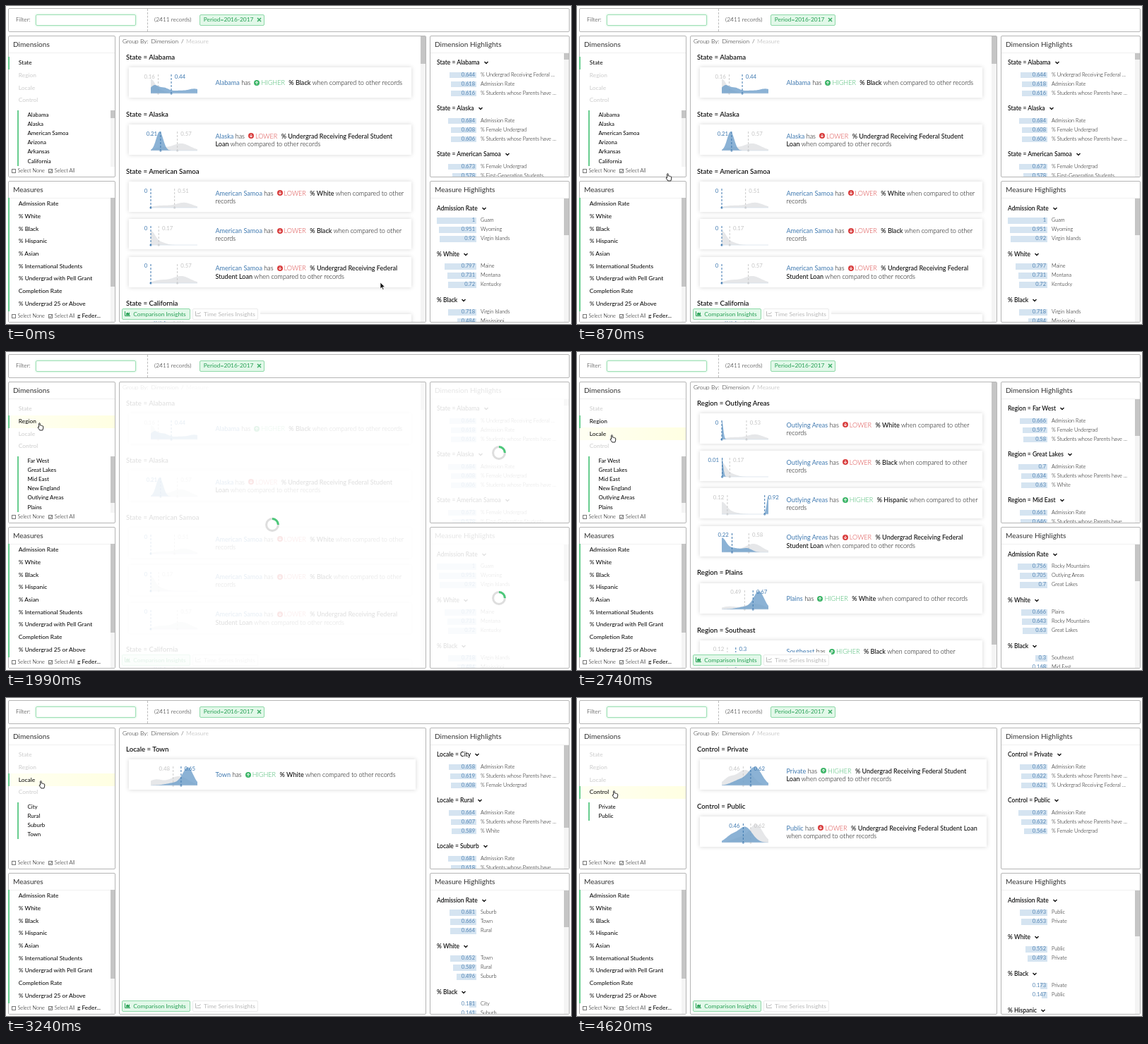
Animation, 800 px wide and 451 px high, one loop 4.86 s. Source, as an HTML page:

```html
<!DOCTYPE html>
<html lang="en">
<head>
<meta charset="utf-8">
<title>Insights dashboard</title>
<style>
html, body { margin: 0; width: 100%; height: 100%; overflow: hidden; background: #fff; }
#stage { position: relative; width: 800px; height: 451px; overflow: hidden; font: 8.4px Lato, sans-serif; color: #222; }
#stage div, #stage i, #stage svg { position: absolute; box-sizing: border-box; }
/* Zero line height plus this margin makes "top" the text baseline. */
i { font-style: normal; white-space: nowrap; line-height: 0; margin-top: -.387em; }
b { font-weight: 500; color: #111; }
svg { overflow: visible; }
.panel { border: 1px solid #b5b5b5; border-radius: 2px; background: #fff; }
.layer { left: 0; top: 0; width: 800px; height: 451px; }
.title { font-size: 10.1px; color: #333; }
.soft { font-weight: 300; color: #111; }
.dim { color: #ccc; }
.item { font-size: 7.9px; color: #000; }
.small { font-size: 7.3px; font-weight: 300; color: #000; }
.row { color: #000; }
.group { font-size: 9.7px; font-weight: 500; color: #000; }
.head { font-size: 8.5px; font-weight: 500; color: #000; }
.head svg { left: 100%; margin-left: 6px; top: -2px; }
.value { font-size: 7.5px; color: #5384b3; transform: translateX(-100%); }
.num { font-size: 7.8px; }
.right { transform: translateX(-100%); }
.note { font-size: 9.05px; font-weight: 300; color: #000; }
.note em { font-style: normal; font-weight: 400; color: #3f79b0; }
.note span { position: relative; margin: 0 3px 0 2.6px; padding-left: 10px; }
.note span svg { left: 0; top: 1.7px; }
.up { color: #3db568; }
.down { color: #d93f3f; }
.tag { color: #27a055; }
.off { color: #b8b8b8; }
.chip { background: #e2f8e9; border: 1px solid #8ed9a8; border-radius: 2px; }
.input { border: 1px solid #9fe0b6; border-radius: 2px; box-shadow: 0 0 3px #b4ebc7; }
.tab { border: 1px solid #ebebeb; border-radius: 2px; }
.divider { border-left: 1px dashed #bbb; }
.cover { background: #fff; }
.card { background: #fff; box-shadow: 0 0 6px rgba(0,0,0,.17); }
.bar { background: #d5e4f1; }
.green { background: #68cd8f; }
.thumb { background: #c5c5c5; }
.track { background: #f4f4f4; }
.rule { height: 1px; background: #f0f0f0; }
.tick { border: .7px solid #777; }
.clip { overflow: hidden; }
#hover { left: 4px; width: 150px; height: 18px; background: linear-gradient(90deg, #fffff2, #ffffe2); }
</style>
</head>
<body>
<div id="stage"></div>
<script>
const LOOP = 4860, STEP = 125;
const DIMENSIONS = ['State', 'Region', 'Locale', 'Control'];
const rowY = k => 83.7 + k * 17.65;

const text = (x, y, html, cls = '') => `<i class="${cls}" style="left:${x}px;top:${y}px">${html}</i>`;
const box = (x, y, w, h, cls, inner = '') =>
  `<div class="${cls}" style="left:${x}px;top:${y}px;width:${w}px;height:${h}px">${inner}</div>`;
const svg = (x, y, w, h, inner) =>
  `<svg style="left:${x}px;top:${y}px" width="${w}" height="${h}">${inner}</svg>`;
const layer = (id, inner) => `<div class="layer" id="${id}">${inner}</div>`;

// Distributions: lists of [mean, spread, height].
const WHITE = [[.72, .17, 7], [.25, .2, 3]];
const BLACK = [[0, .09, 19], [.2, .12, 4]];
const HISPANIC = [[0, .1, 16], [.2, .15, 3]];
const LOAN = [[.65, .19, 10], [.2, .15, 4]];
const SPIKE = [[0, .03, 27]];
const PEAK = [[.8, .11, 24], [.55, .2, 4]];
const NONE = [];

const same = 'when compared to other';
const loan = ['<b>% Undergrad Receiving Federal</b>', `<b>Student Loan</b> ${same} records`];
const loanWide = ['<b>% Undergrad Receiving Federal Student</b>', `<b>Loan</b> ${same} records`];
const split = m => [`<b>% ${m}</b> ${same}`, 'records'];
const whole = m => [`<b>% ${m}</b> ${same} records`];

const AR = 'Admission Rate', FU = '% Female Undergrad', UR = '% Undergrad Receiving Federal ...',
  SP = '% Students whose Parents have ...', W = '% White', B = '% Black';

// Each group: [name, cards]; each card: [up, value, other value, text lines, shape, other shape].
const VIEWS = [
  {
    items: ['Alabama', 'Alaska', 'American Samoa', 'Arizona', 'Arkansas', 'California'],
    itemThumb: 11, mainThumb: 39, dimThumb: 10, measureThumb: 53,
    groups: [
      ['Alabama', [[1, .44, .16, whole('Black'), [[.07, .09, 11], [.28, .1, 7], [.6, .18, 4], [.95, .13, 6]], BLACK]]],
      ['Alaska', [[0, .21, .57, loanWide, [[.19, .075, 27]], LOAN]]],
      ['American Samoa', [
        [0, 0, .51, split('White'), NONE, WHITE],
        [0, 0, .17, split('Black'), NONE, BLACK],
        [0, 0, .57, loan, NONE, LOAN]]],
      ['California', [[0, .3, .5, ['', ''], NONE, NONE]]],
    ],
    dims: [['Alabama', [.644, UR], [.618, AR], [.616, SP]],
      ['Alaska', [.684, AR], [.608, FU], [.606, SP]],
      ['American Samoa', [.673, FU], [.578, '% First-Generation Students']]],
    measures: [[AR, [1, 'Guam'], [.951, 'Wyoming'], [.92, 'Virgin Islands']],
      [W, [.797, 'Maine'], [.731, 'Montana'], [.72, 'Kentucky']],
      [B, [.718, 'Virgin Islands'], [.484, 'Mississippi']]],
  },
  {
    items: ['Far West', 'Great Lakes', 'Mid East', 'New England', 'Outlying Areas', 'Plains'],
    itemThumb: 66, mainThumb: 372, dimThumb: 53, measureThumb: 53,
    groups: [
      ['Outlying Areas', [
        [0, 0, .53, split('White'), SPIKE, WHITE],
        [0, .01, .17, split('Black'), SPIKE, BLACK],
        [1, .92, .12, split('Hispanic'), [[1, .035, 26]], HISPANIC],
        [0, .22, .58, loan, [[0, .09, 19], [.25, .15, 6], [.55, .1, 5]], [[.68, .18, 12], [.25, .15, 3]]]]],
      ['Plains', [[1, .67, .49, whole('White'), PEAK, [[.7, .2, 8], [.15, .16, 4]]]]],
      ['Southeast', [[1, .3, .12, split('Black'), [[.1, .12, 9], [.4, .25, 5]], BLACK]]],
    ],
    dims: [['Far West', [.666, AR], [.597, FU], [.58, SP]],
      ['Great Lakes', [.7, AR], [.634, SP], [.63, W]],
      ['Mid East', [.661, AR], [.646, SP]]],
    measures: [[AR, [.756, 'Rocky Mountains'], [.705, 'Outlying Areas'], [.7, 'Great Lakes']],
      [W, [.666, 'Plains'], [.643, 'Rocky Mountains'], [.63, 'Great Lakes']],
      [B, [.3, 'Southeast'], [.168, 'Mid East']]],
  },
  {
    items: ['City', 'Rural', 'Suburb', 'Town'],
    dimThumb: 118, measureThumb: 53,
    groups: [['Town', [[1, .65, .48, whole('White'), PEAK, [[.6, .2, 13], [.1, .15, 8]]]]]],
    dims: [['City', [.658, AR], [.619, SP], [.608, FU]],
      ['Rural', [.664, AR], [.607, SP], [.589, W]],
      ['Suburb', [.681, AR], [.618, SP]]],
    measures: [[AR, [.681, 'Suburb'], [.666, 'Town'], [.664, 'Rural']],
      [W, [.652, 'Town'], [.589, 'Rural'], [.496, 'Suburb']],
      [B, [.181, 'City'], [.161, 'Suburb']]],
  },
  {
    items: ['Private', 'Public'],
    measureThumb: 66,
    groups: [
      ['Private', [[1, .62, .46, loanWide, [[.72, .14, 25], [.4, .17, 8]], [[.5, .17, 22], [.15, .12, 10]]]]],
      ['Public', [[0, .46, .62, ['<b>% Undergrad Receiving Federal Student Loan</b>', `${same} records`],
        [[.5, .15, 22], [.2, .12, 9]], [[.74, .14, 25], [.4, .17, 7]]]]],
    ],
    dims: [['Private', [.653, AR], [.622, SP], [.621, UR]],
      ['Public', [.693, AR], [.632, SP], [.564, FU]]],
    measures: [[AR, [.693, 'Public'], [.653, 'Private']],
      [W, [.552, 'Public'], [.493, 'Private']],
      [B, [.173, 'Private'], [.147, 'Public']], ['% Hispanic']],
  },
];

function area(shape, color) {
  if (!shape.length) return '';
  let d = 'M0 37';
  for (let x = 0; x <= 66; x++) {
    const h = shape.reduce((sum, [m, s, k]) => sum + k * Math.exp(-(((x / 66 - m) / s) ** 2) / 2), 0);
    d += `L${x} ${(37 - Math.min(h, 28)).toFixed(1)}`;
  }
  return `<path d="${d}L66 37Z" fill="${color}"/>`;
}

function marker(v, color) {
  const x = v * 66;
  return `<path d="M${x} 10V37" stroke="${color}" stroke-dasharray="3 2"/><circle cx="${x}" cy="37" r="1.5" fill="${color}"/>`;
}

function label(v, other, y, color) {
  const low = v < other;
  return text(205 + v * 66 + (low ? -4.7 : 4.7), y, `<span style="color:${color}">${v}</span>`, low ? 'num right' : 'num');
}

function card(name, [up, v, other, lines, shape, otherShape], y, width) {
  const arrow = `<svg width="8" height="8" viewBox="-4 -4 8 8"><circle r="4" fill="currentColor"/>` +
    `<path d="M0-2.2V2M-1.9.2 0 2 1.9.2" transform="scale(1 ${up ? -1 : 1})" stroke="#fff" fill="none"/></svg>`;
  const verdict = `<span class="${up ? 'up' : 'down'}">${arrow}${up ? 'HIGHER' : 'LOWER'}</span>`;
  const first = y + (lines.length > 1 ? 20 : 25.7);
  return box(174, y, width, 43, 'card') +
    svg(205, y, 66, 43, area(otherShape, '#e6e7e9') + marker(other, '#ccc') +
      area(shape, 'rgba(107,157,202,.78)') + marker(v, '#3f79b0') + '<path d="M0 37H66" stroke="#d3dfea" stroke-width=".7"/>') +
    label(other, v, y + 15.6, '#c4c4c4') + label(v, other, y + 15.6, '#3f79b0') +
    text(296.5, first, `<em>${name}</em> has ${verdict} ${lines[0]}`, 'note') +
    (lines[1] ? text(296.5, first + 11.4, lines[1], 'note') : '');
}

function insights(view, k) {
  let y = 75.5, out = '';
  const width = view.mainThumb ? 400 : 406;
  for (const [name, cards] of view.groups) {
    out += text(170, y, `${DIMENSIONS[k]} = ${name}`, 'group');
    y += 11.5;
    for (const c of cards) {
      out += card(name, c, y, width);
      y += 53.2;
    }
    y += 16.4;
  }
  return out + scrollbar(587, 43, 7, 405, view.mainThumb);
}

const scrollbar = (x, y, w, h, thumb) => thumb ? box(x, y, w, h, 'track') + box(x, y, w, thumb, 'thumb') : '';

const chevron = '<svg width="6" height="5"><path d="M.5 1 3 3.5 5.5 1" fill="none" stroke="#111" stroke-width="1.4"/></svg>';

function highlights(groups, y, scale, prefix, thumb) {
  let out = scrollbar(790, y - 17.5, 7, 176, thumb);
  for (const [name, ...rows] of groups) {
    out += text(610, y, prefix + name + chevron, 'head');
    y += 17.5;
    for (const [v, what] of rows) {
      out += box(666 - v * scale, y - 7.3, v * scale, 8.6, 'bar') + text(664, y - .3, v, 'value') + text(672, y, what, 'small');
      y += 13;
    }
    y += 8.5;
  }
  return out;
}

// Clips content drawn in stage coordinates to a rectangle.
const clip = (x, y, w, h, inner) => box(x, y, w, h, 'clip', `<div style="left:${-x}px;top:${-y}px">${inner}</div>`);

const each = (id, draw) => VIEWS.map((v, k) => layer(id + k, draw(v, k))).join('');

const selectors = y => box(4, y - 7, 96, 12, 'cover') +
  box(8, y - 5.6, 6, 6, 'tick') + text(16.5, y, 'Select None', 'small') +
  box(60, y - 5.6, 6, 6, 'tick') + svg(60, y - 5.6, 6, 6, '<path d="M1.3 3 2.7 4.4 5 1.3" fill="none" stroke="#555" stroke-width=".8"/>') +
  text(68.7, y, 'Select All', 'small');

const sidebar = (view, k) => box(3, rowY(k) - 11.7, 2, 18, 'green') +
  DIMENSIONS.map((d, n) => text(17.8, rowY(n), d, 'dim')).join('') +
  box(16, 148, 1.7, Math.min(80, view.items.length * 13.1), 'green') +
  view.items.map((s, n) => text(30.5, 157.3 + n * 13.05, s, 'item')).join('') +
  scrollbar(147.5, 148, 6.5, 80, view.itemThumb);

const measureNames = [AR, W, B, '% Hispanic', '% Asian', '% International Students',
  '% Undergrad with Pell Grant', 'Completion Rate', '% Undergrad 25 or Above'];

const tabs = box(161, 426, 199, 21, 'cover') + box(164, 429, 96.5, 15.5, 'chip') +
  svg(168, 433, 8, 7, '<path d="M.5 0V6.5H8" fill="none" stroke="#27a055"/><path d="M2 5.5V3L4 1.5 5.5 3 7 1V5.5Z" fill="#27a055"/>') +
  text(180.3, 439.8, 'Comparison Insights', 'tag') +
  box(264, 429, 92.5, 15.5, 'tab') +
  svg(268, 433, 8, 7, '<path d="M.5 0V6.5H8M2 4.5 3.7 2.7 5 4 7.5 1" fill="none" stroke="#bbb"/>') +
  text(280, 439.8, 'Time Series Insights', 'off');

const spinner = (x, y) => svg(x, y, 1, 1,
  '<g class="spin" fill="none" stroke-width="3"><circle r="8.4" stroke="#dedede"/><path d="M0-8.4A8.4 8.4 0 0 1 8.4 0" stroke="#4cc87a"/></g>');

document.getElementById('stage').innerHTML =
  box(3, 3, 795, 34, 'panel') +
  text(14, 22.7, 'Filter:', 'soft') + box(42, 11.5, 142, 16.5, 'input') + box(199.5, 4, 1, 32, 'divider') +
  text(210, 22.7, '(2411 records)', 'soft') +
  box(274, 11.5, 92, 16.5, 'chip') + text(279.8, 22.7, 'Period=2016-2017', 'tag') +
  svg(356, 17, 5, 5, '<path d="M0 0 5 5M5 0 0 5" stroke="#3fae69" stroke-width="1.5"/>') +
  box(3, 42, 152, 201, 'panel') + box(3, 248, 152, 201, 'panel') +
  box(160, 42, 435, 407, 'panel') +
  box(600, 42, 198, 201, 'panel') + box(600, 248, 198, 201, 'panel') +
  text(10, 58, 'Dimensions', 'title') + box(4, 66, 150, 1, 'rule') +
  '<div id="hover"></div>' + each('side', sidebar) + selectors(237) +
  text(10, 264, 'Measures', 'title') + box(4, 272, 150, 1, 'rule') + box(3, 272, 2, 161, 'green') +
  measureNames.map((m, n) => text(17.8, 283.5 + n * 17.67, m, 'row')).join('') +
  text(101, 442.5, 'g Feder...', 'row') + selectors(443) +
  scrollbar(147.5, 272, 6.5, 176, 126) +
  layer('content',
    each('view', (v, k) =>
      clip(161, 43, 433, 405, insights(v, k)) +
      clip(601, 66, 196, 176, highlights(v.dims, 83.7, 59, DIMENSIONS[k] + ' = ', v.dimThumb)) +
      clip(601, 272, 196, 176, highlights(v.measures, 289.8, 56, '', v.measureThumb))) +
    text(165, 53.7, 'Group By:', 'soft') + text(205.5, 53.7, 'Dimension', 'soft') +
    text(248, 53.7, '/', 'soft') + text(255, 53.7, 'Measure', 'dim') +
    text(607, 58, 'Dimension Highlights', 'title') + box(601, 66, 196, 1, 'rule') +
    text(607, 264, 'Measure Highlights', 'title') + box(601, 272, 196, 1, 'rule') + tabs) +
  layer('loader', spinner(377, 245.3) + spinner(698.3, 142.7) + spinner(698.3, 348.7)) +
  svg(0, 0, 1, 1,
    '<path id="arrow" d="M0 0V9L2.1 7.1 3.6 10.4 5 9.8 3.6 6.6H6.5Z" fill="#111" stroke="#fff" stroke-width=".7"/>' +
    '<path id="hand" d="M1.6 6V1.2Q2.5-.2 3.2 1.2V4Q4.2 3.3 4.8 4.4 5.8 3.8 6.3 4.9 7.6 4.5 7.7 5.8V8L6.8 11H2.8L.2 7.2Q0 5.8 1.6 6.6Z" fill="#fff" stroke="#111" stroke-width=".9"/>');

// [ms, x, y], straight lines between.
const PATH = [[115, 530, 392], [865, 126, 237], [1365, 66, 148], [1615, 45, 100],
  [2240, 45, 100], [2740, 47, 117], [3240, 47, 117], [3740, 50, 131]];

// [start ms, hovered row, selected row, shown view, loading]
const STATES = [
  [-STEP, -1, 0, 0, 0],
  [1490, 2, 0, 0, 0], [1615, 1, 0, 0, 0],
  [1740, 1, 1, 0, .5], [1865, 1, 1, 0, 1], [2115, 1, 1, 1, 0],
  [2490, 2, 1, 1, 0], [2990, 2, 2, 1, 1], [3240, 2, 2, 2, 0],
  [3615, 3, 2, 2, 0], [3740, 3, 3, 2, .6], [3865, 3, 3, 2, 1], [4365, 3, 3, 3, 0],
];

function cursorAt(t) {
  const next = PATH.findIndex(p => p[0] > t);
  if (next === 0) return PATH[0].slice(1);
  if (next < 0) return PATH.at(-1).slice(1);
  const [t0, x0, y0] = PATH[next - 1], [t1, x1, y1] = PATH[next];
  const u = (t - t0) / (t1 - t0);
  return [x0 + (x1 - x0) * u, y0 + (y1 - y0) * u];
}

const $ = id => document.getElementById(id);
const show = (el, on) => { el.style.visibility = on ? 'visible' : 'hidden'; };
const spins = document.querySelectorAll('.spin');

function draw() {
  // The screen refreshes eight times a second.
  const t = Math.floor((performance.now() % LOOP + 10) / STEP) * STEP - 10;
  const [, hovered, selected, shown, loading] = STATES.findLast(s => s[0] <= t);
  VIEWS.forEach((_, k) => {
    show($('side' + k), k === selected);
    show($('view' + k), k === shown);
  });
  show($('hover'), hovered >= 0);
  $('hover').style.top = rowY(hovered) - 11.7 + 'px';
  $('side' + selected).querySelectorAll('i:not(.item)').forEach((el, n) => {
    el.className = n === selected || n === hovered ? 'row' : 'dim';
  });
  $('content').style.opacity = 1 - .88 * loading;
  $('loader').style.opacity = loading;
  spins.forEach(s => s.setAttribute('transform', `rotate(${(t - 1990) * .36})`));
  const hand = t >= 865;
  show($('arrow'), !hand);
  show($('hand'), hand);
  $(hand ? 'hand' : 'arrow').setAttribute('transform', `translate(${cursorAt(t)})`);
  requestAnimationFrame(draw);
}
draw();
</script>
</body>
</html>
```
